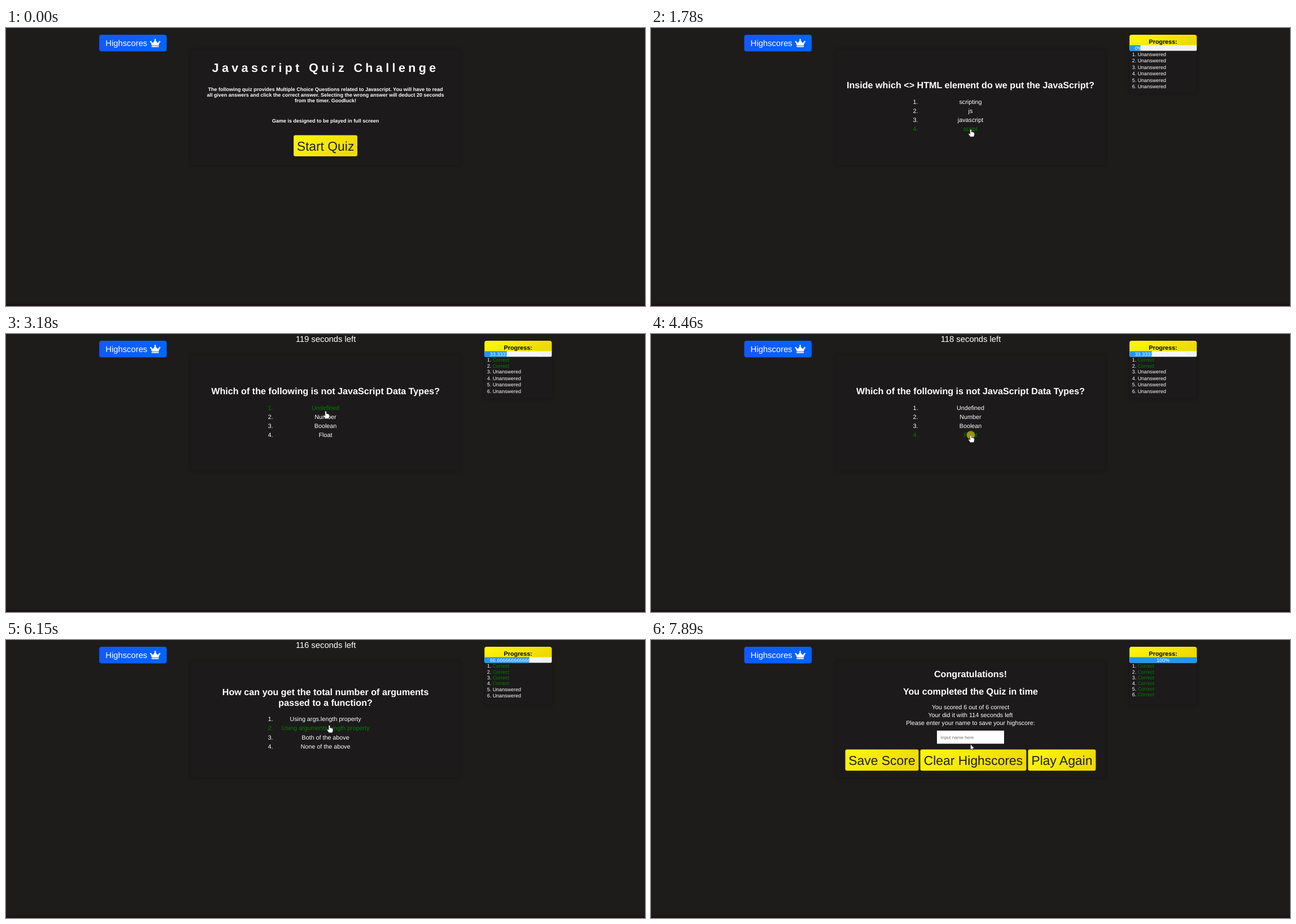
Animation, 1133 px wide and 494 px high, one loop 8000 ms. Source, as an HTML page:

```html
<!DOCTYPE html>
<html lang="en">
<head>
<meta charset="utf-8">
<title>Javascript Quiz</title>
<style>
html, body { margin: 0; width: 100%; height: 100%; overflow: hidden; background: #1d1c1a; }
svg { display: block; width: 100%; height: 100%; }
text { font-family: "Liberation Sans", Arial, sans-serif; text-rendering: geometricPrecision; white-space: pre; }
.panel { fill: #1c1a1b; filter: drop-shadow(0 0 3px rgba(0, 0, 0, .3)); }
.hover { filter: drop-shadow(0 2.7px 4.7px rgba(252, 234, 14, .4)); }
</style>
</head>
<body>
<svg viewBox="0 0 1133 494">
  <defs>
    <linearGradient id="yellow" x2="1" y2=".3"><stop stop-color="#fff80a"/><stop offset="1" stop-color="#eedb04"/></linearGradient>
    <linearGradient id="blue" x2="1"><stop stop-color="#1259ff"/><stop offset="1" stop-color="#0264ff"/></linearGradient>
  </defs>
  <rect width="1133" height="494" fill="#1d1c1a"/>
  <rect y="490" width="1133" height="4" fill="#1a1416"/>
  <rect class="panel" x="328" y="38" width="477" height="206" rx="3"/>
  <rect x="165.3" y="12" width="119.6" height="29.6" rx="4" fill="url(#blue)"/>
  <text x="176.5" y="32.3" font-size="14.8" fill="#fff">Highscores</text>
  <g transform="translate(255.3 19.2) scale(.0289)" fill="#fff">
    <circle cx="48" cy="176" r="48"/><circle cx="320" cy="48" r="48"/><circle cx="592" cy="176" r="48"/>
    <path d="M40 190 L92 196 L164 239 Q192 252 208 228 L290 85 H350 L432 228 Q448 252 476 239 L548 196 L600 190 L528 416 H112Z"/>
    <rect x="96" y="448" width="448" height="64" rx="16"/>
  </g>
  <g id="scene"></g>
  <g id="pointer"></g>
</svg>
<script>
const LOOP = 8000, MID = 566.5, ROW = 16.1;
const BODY = 10.77, SMALL = 8.97, HEAD = 16.15, BIG = 22.88;

const questions = [
  { at: 1020, title: ['Inside which &lt;&gt; HTML element do we put the JavaScript?'],
    options: ['scripting', 'js', 'javascript', 'script'] },
  { at: 2160, title: ['Which of the following types of variable is visible only', 'within a function where it is defined?'],
    options: ['Local variable', 'Global variable', 'Both of the above', 'None of the above'] },
  { at: 3115, title: ['Which of the following is not JavaScript Data Types?'],
    options: ['Undefined', 'Number', 'Boolean', 'Float'] },
  { at: 4530, title: ['Which of the following is correct about features of', 'JavaScript?'],
    options: ['It can not Handling dates and time', 'JavaScript is a object-based scripting|language',
      'JavaScript is not interpreter based|scripting language', 'All of the above'] },
  { at: 5750, title: ['How can you get the total number of arguments', 'passed to a function?'],
    options: ['Using args.length property', 'Using arguments.length property', 'Both of the above', 'None of the above'] },
  { at: 6750, title: ['What are the types of Pop up boxes available in', 'JavaScript?'],
    options: ['Alert', 'Prompt', 'Confirm', 'All of the above'] },
];
const END = 7890;
const ticks = [2160, 3115, 4060, 5090, 6100, 7090];
const clicks = [[890, 960], [2030, 2160], [3050, 3115], [4460, 4530], [5680, 5750], [6680, 6750], [7820, 7890]];

// Pointer tip: time, x, y
const path = [
  [70, 1012, 466], [820, 590, 203], [1420, 590, 203], [1780, 567, 180], [2440, 567, 180],
  [2780, 567, 137], [3580, 567, 137], [4060, 567, 179.5], [4730, 567, 179.5], [5220, 574, 148.5],
  [6080, 574, 148.5], [6480, 566.5, 185], [7090, 566.5, 185], [7160, 572.5, 186],
  [7420, 572.5, 186], [7490, 566.5, 185.3], [LOOP, 566.5, 185.3],
];

function tipAt(t) {
  if (t < path[0][0]) return null;
  const i = path.findIndex(p => t < p[0]);
  const [t0, x0, y0] = path[i - 1], [t1, x1, y1] = path[i];
  const k = (t - t0) / (t1 - t0), e = k * k * (3 - 2 * k);
  return [x0 + (x1 - x0) * e, y0 + (y1 - y0) * e];
}

function label(str, x, y, size, { fill = '#fff', bold = false, anchor = 'middle', gap = 0 } = {}) {
  return `<text x="${x}" y="${y.toFixed(2)}" font-size="${size}" fill="${fill}" text-anchor="${anchor}"` +
    `${bold ? ' font-weight="700"' : ''}${gap ? ` letter-spacing="${gap}"` : ''}>${str}</text>`;
}
const bold = (str, y, size) => label(str, MID, y, size, { bold: true });

function button(str, x, y, width, hot) {
  return `<rect ${hot ? 'class="hover" ' : ''}x="${x}" y="${y}" width="${width}" height="37.6" rx="3" fill="url(#yellow)"/>` +
    label(str, x + width / 2, y + 27, BIG, { fill: '#1d1c1a' });
}

const inside = (tip, x, y, w, h) =>
  tip && tip[0] >= x && tip[0] <= x + w && tip[1] >= y && tip[1] <= y + h;

function intro(tip) {
  const hot = inside(tip, 510, 190.5, 113, 37.6);
  const svg = label('Javascript Quiz Challenge', MID, 78.3, 21.53, { bold: true, gap: 5.38 }) +
    bold('The following quiz provides Multiple Choice Questions related to Javascript. You will have to read', 111.5, SMALL) +
    bold('all given answers and click the correct answer. Selecting the wrong answer will deduct 20 seconds', 121.7, SMALL) +
    bold('from the timer. Goodluck!', 131.9, SMALL) +
    bold('Game is designed to be played in full screen', 168.3, SMALL) +
    button('Start Quiz', 510, 190.5, 113, hot);
  return { svg, hot };
}

function quiz({ title, options }, tip) {
  const rows = options.map(o => o.split('|'));
  const count = rows.flat().length;
  let y = 101.5 - 9.3 * (title.length - 1) - ROW / 2 * (count - 4);
  let svg = '', hot = false;
  title.forEach((line, i) => { svg += bold(line, y + 5.8 + i * 18.6, HEAD); });
  y += (title.length - 1) * 18.6 + 29.6;
  rows.forEach((lines, i) => {
    const over = inside(tip, 465, y - ROW / 2, 192, ROW * lines.length);
    const fill = over ? '#008000' : '#fff';
    svg += label(`${i + 1}.`, 464.6, y + 3.9, BODY, { fill, anchor: 'start' });
    lines.forEach((line, j) => { svg += label(line, MID, y + 3.9 + j * ROW, BODY, { fill }); });
    y += ROW * lines.length;
    hot = hot || over;
  });
  return { svg, hot };
}

function result() {
  const svg = bold('Congratulations!', 66.2, HEAD) +
    bold('You completed the Quiz in time', 96.7, HEAD) +
    label('You scored 6 out of 6 correct', MID, 122.9, BODY) +
    label('Your did it with 114 seconds left', MID, 137.1, BODY) +
    label('Please enter your name to save your highscore:', MID, 151.2, BODY) +
    '<rect x="507" y="161" width="119" height="23.3" fill="#fff"/>' +
    label('Input name here', 513.7, 175.5, 8.05, { fill: '#757575', anchor: 'start' }) +
    button('Save Score', 344.5, 194.6, 130) +
    button('Clear Highscores', 477.5, 194.6, 188) +
    button('Play Again', 668.6, 194.6, 120);
  return { svg, hot: false };
}

function progress(done) {
  const x = 848.4, width = 119.3, pad = 9.6;
  const bar = Math.max(width * done / 6, pad * 2);
  const centred = done === 3 || done === 6;
  const strip = (w, fill) => `<path d="M${x} 30.5h${w}v7.4q0 2.6 -2.6 2.6h${5.2 - w}q-2.6 0 -2.6 -2.6z" fill="${fill}"/>`;
  let svg = `<rect class="panel" x="${x}" y="30" width="${width}" height="85"/>` +
    `<path d="M${x} 31V16q0-4 4-4h${width - 8}q4 0 4 4V31z" fill="url(#yellow)"/>` +
    label('Progress:', 908, 27.6, BODY, { fill: '#000', bold: true }) +
    strip(width, '#f1f1f1') + strip(bar, '#2196f3') +
    label(`${done / 6 * 100}%`, centred ? x + bar / 2 : x + pad, 38.8, SMALL, { anchor: centred ? 'middle' : 'start' });
  let y = 41;
  for (let i = 1; i <= 6; i++) {
    const ok = i <= done, base = y + (ok ? 8.3 : 8.8);
    svg += label(`${i}.`, 852.9, base, SMALL, { anchor: 'start' }) +
      label(ok ? 'Correct' : 'Unanswered', 862.9, base, SMALL, { anchor: 'start', fill: ok ? '#008000' : '#fff' });
    y += ok ? 10.2 : 11.45;
  }
  return svg;
}

const hand = '<path d="M-1.3 .6Q0-.8 1.200 .6V4.600Q2.600 4 3.300 5Q4.600 4.600 5.100 5.700Q6.400 5.600 6.400 7V10L5.200 13.300H-.9L-4 8.800Q-4.300 7.200-2.900 7.300L-1.300 8.700Z" fill="#fff" stroke="#111" stroke-width=".5"/>';
const arrow = '<path d="M0 0V9.600L2.200 7.600L3.800 11L5.300 10.300L3.800 7.100H6.700Z" fill="#fff" stroke="#111" stroke-width=".5"/>';

const sceneNode = document.getElementById('scene');
const pointerNode = document.getElementById('pointer');
let shown = '';

function render(t) {
  const tip = tipAt(t);
  const index = questions.filter(q => t >= q.at).length - 1;
  const ended = t >= END;
  const view = ended ? result() : index < 0 ? intro(tip) : quiz(questions[index], tip);
  let svg = view.svg;
  if (index >= 0) svg += progress(ended ? 6 : index);
  const passed = ticks.filter(k => t >= k).length;
  if (passed && !ended) svg += label(`${121 - passed} seconds left`, 567, 14.3, 14.8);
  if (svg !== shown) sceneNode.innerHTML = shown = svg;

  const pressed = clicks.some(([from, to]) => t >= from && t < to);
  pointerNode.innerHTML = tip
    ? (pressed ? '<circle r="7.3" fill="#dccb10" fill-opacity=".65"/>' : '') + (view.hot ? hand : arrow) : '';
  if (tip) pointerNode.setAttribute('transform', `translate(${tip[0].toFixed(2)} ${tip[1].toFixed(2)})`);
}

const start = performance.now();
function frame() {
  render((performance.now() - start) % LOOP);
  requestAnimationFrame(frame);
}
frame();
</script>
</body>
</html>
```
